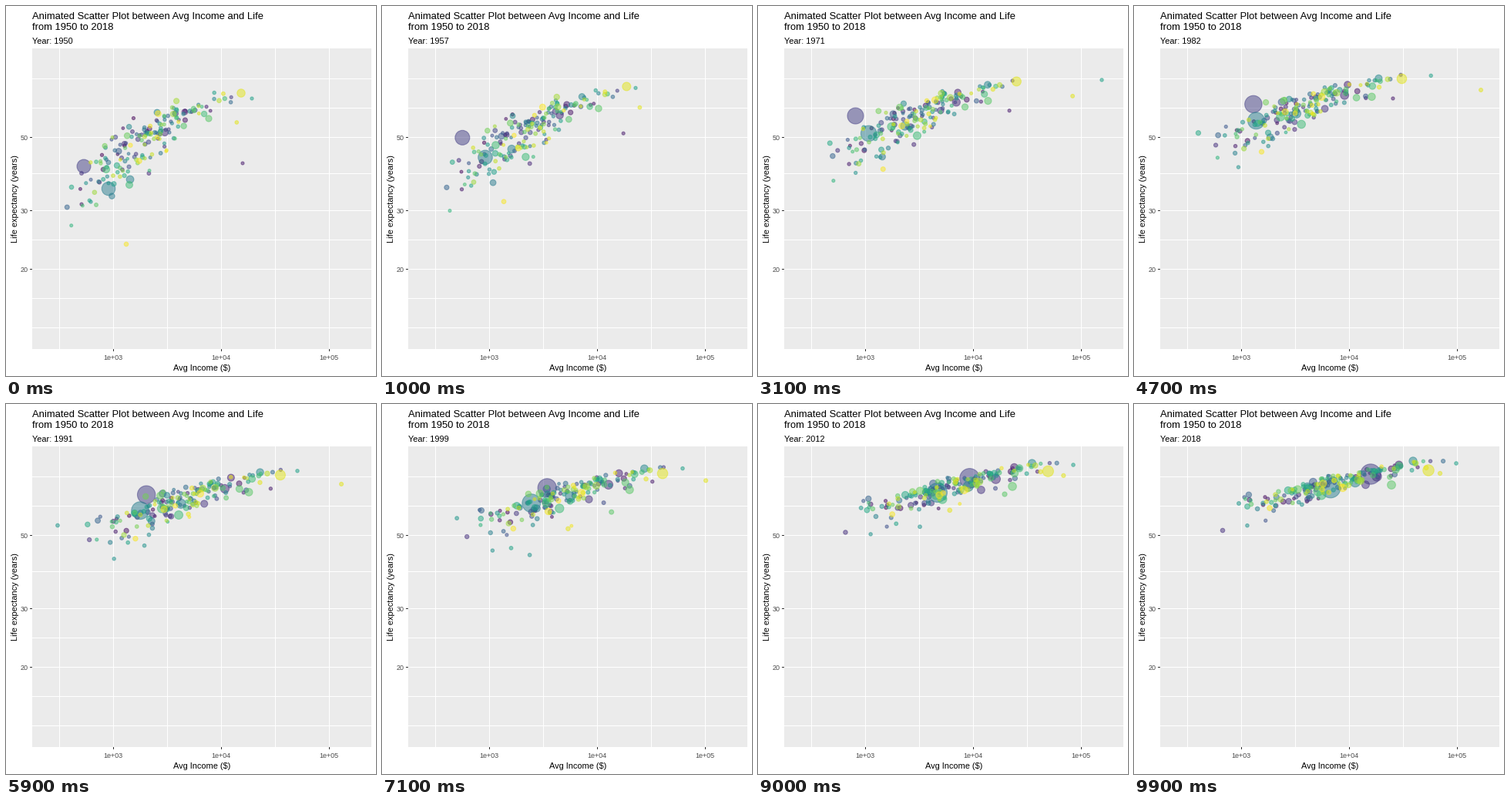
Recreate the animation shown at these times as a matplotlib script. Size 480 px wide and 480 px high, loop 10000 ms.

```python
import numpy as np
import matplotlib.pyplot as plt
from matplotlib.animation import FuncAnimation
from matplotlib.patches import Rectangle

SIZE, DPI, FRAMES = 480, 100, 100
PT = 72 / DPI  # points per pixel
COUNT = 184
plt.rcParams["font.family"] = "Liberation Sans"

times = np.arange(FRAMES)
p = times / (FRAMES - 1)
dots = []  # (hue, x, y, radius), the last three per frame


def add(hue, pop, x, y):
    """Store a dot whose population grows to pop (millions) over the loop."""
    radius = 1.75 + 11.4 * np.sqrt(pop * (0.4 + 0.6 * p) / 1428)
    dots.append((hue, x, y, radius))


def bump(peak, height, width):
    """A triangular pulse in time."""
    return height * np.clip(1 - np.abs(times - peak) / width, 0, 1)


def travel(hue, pop, start, end, ease=1.0, dx=0, dy=0):
    """Income grows as p**ease, life expectancy quickly at first."""
    (x0, y0), (x1, y1) = start, end
    add(hue, pop, x0 + (x1 - x0) * p ** ease + dx,
        y0 + (y1 - y0) * p ** 0.5 + dy)


def trend(x):
    """Life expectancy against income: steep at first, flatter later."""
    s = np.clip((x - 90) / 310, 0, 1)
    return 98 - 26 * p + (148 - 73 * p ** 0.75) * (1 - s) ** (2 - 0.8 * p)


# Large countries
travel(0.18, 1428, (101, 208), (307, 91), 1.8, dy=bump(15, 95, 5))
travel(0.42, 1350, (133, 237), (255, 109), 2.1)
travel(0.955, 327, (305, 113), (382, 86), 0.8)
travel(0.43, 267, (161, 225), (287, 101), 1.25)
travel(0.125, 210, (206, 164), (315, 94), 0.65)
travel(0.46, 127, (196, 138), (362, 74), 0.42)
travel(0.74, 145, (263, 146), (334, 105), 0.6)
travel(0.68, 196, (160, 232), (243, 118), 0.5)
travel(0.69, 212, (130, 212), (239, 113), 0.8)

# Oil states, wars and famines
travel(0.57, 3, (319, 120), (418, 77), dx=bump(31, 96, 20))
travel(0.955, 8, (285, 151), (397, 90), dx=bump(44, 119, 50))
travel(0.07, 2, (307, 204), (368, 82))
travel(0.99, 28, (156, 309), (176, 135))
travel(0.74, 12, (117, 258), (152, 130), dy=bump(64, 273, 4))
travel(0.16, 16, (150, 197), (184, 132), dy=bump(39, 151, 4))
travel(0.14, 11, (98, 217), (115, 164), dy=bump(32, 172, 1))
travel(0.53, 5, (110, 254), (136, 129), dx=bump(62, -72, 16))
travel(0.6, 29, (85, 235), (147, 133), dx=bump(47, -31, 25))

# Everyone else wanders about the trend; an epidemic strikes a few
rng = np.random.default_rng(12)
rest = COUNT - len(dots)
ranks = np.linspace(0.04, 0.98, rest)
hues = rng.permutation(rest) / (rest - 1)
for i, (rank, hue) in enumerate(zip(ranks, hues)):
    z = np.log(rank / (1 - rank)) / 1.7
    z = z + 0.2 * (np.sin(rng.uniform(0, 6) + 3 * p) - 0.3 * z)
    x = 181 + 74 * p + z * (52 + 16 * p)
    a, b = rng.normal(size=2)
    wander = a * np.cos(2 * p) + b * np.sin(2 * p)
    wander = np.where(wander < 0, 0.75, 1.1) * wander
    y = trend(x) + wander * (21 - 13 * p) * (1.3 - 0.9 * rank)
    if i % 20 == 10:
        y = y + bump(77, rng.uniform(30, 65), 28)
    pop = min(np.exp(rng.normal(1.8, 1.4)), 110)
    add(hue, pop, x, np.maximum(y, 102 - 28 * p + 4 * (1 - rank)))

dots.sort(key=lambda d: d[0])
X, Y, R = (np.array([d[i] for d in dots]) for i in (1, 2, 3))
colors = plt.get_cmap("viridis")([d[0] for d in dots])
colors[:, 3] = 0.5

fig = plt.figure(figsize=(SIZE / DPI, SIZE / DPI), dpi=DPI, facecolor="white")
ax = fig.add_axes([0, 0, 1, 1])
ax.set(xlim=(0, SIZE), ylim=(SIZE, 0))
ax.axis("off")


def box(x, y, w, h, color):
    ax.add_patch(Rectangle((x, y), w, h, fc=color, lw=0, snap=False))


def label(x, y, text, size, color="black", **kw):
    return ax.text(x, y, text, fontsize=size * PT, color=color, **kw)


def life_y(years):
    return int(170 + 187.7 * np.log(50 / years))


# Panel, then grid lines at the breaks and halfway between them
box(34, 55, 440, 390, "#EBEBEB")
breaks = [life_y(v) for v in (50, 30, 20)]
step = breaks[2] - breaks[1]
breaks = [breaks[0] - step, *breaks, breaks[2] + step]
halves = [(a + b) // 2 for a, b in zip(breaks, breaks[1:])]
for x in range(69, 420, 70):
    box(x, 55, 1, 390, "white")
for y in breaks + halves:
    box(34, y, 440, 1, "white")

for power in (3, 4, 5):
    x = 139 + 140 * (power - 3)
    box(x, 445, 1, 3, "#333333")
    label(x, 459, f"1e+0{power}", 9, "#4D4D4D", ha="center")
for years in (50, 30, 20):
    y = life_y(years)
    box(31, y, 3, 1, "#333333")
    label(29, y + 4, str(years), 9, "#4D4D4D", ha="right")

label(34, 17, "Animated Scatter Plot between Avg Income and Life", 13)
label(34, 31, "from 1950 to 2018", 13)
year = label(34, 49, "", 11)
label(254, 473, "Avg Income (\\$)", 11, ha="center")
label(15, 250, "Life expectancy (years)", 11, rotation=90,
      rotation_mode="anchor", ha="center", va="baseline")

cloud = ax.scatter(X[:, 0], Y[:, 0], s=1, c=colors, edgecolors=colors,
                   linewidths=1.1 * PT, zorder=2)


def update(i):
    cloud.set_offsets(np.column_stack([X[:, i], Y[:, i]]))
    cloud.set_sizes((2 * R[:, i] * PT) ** 2)
    year.set_text(f"Year: {1950 + round(68 * p[i])}")
    return cloud, year


anim = FuncAnimation(fig, update, frames=FRAMES, interval=100,
                     repeat=True, repeat_delay=0)
plt.show()
```
